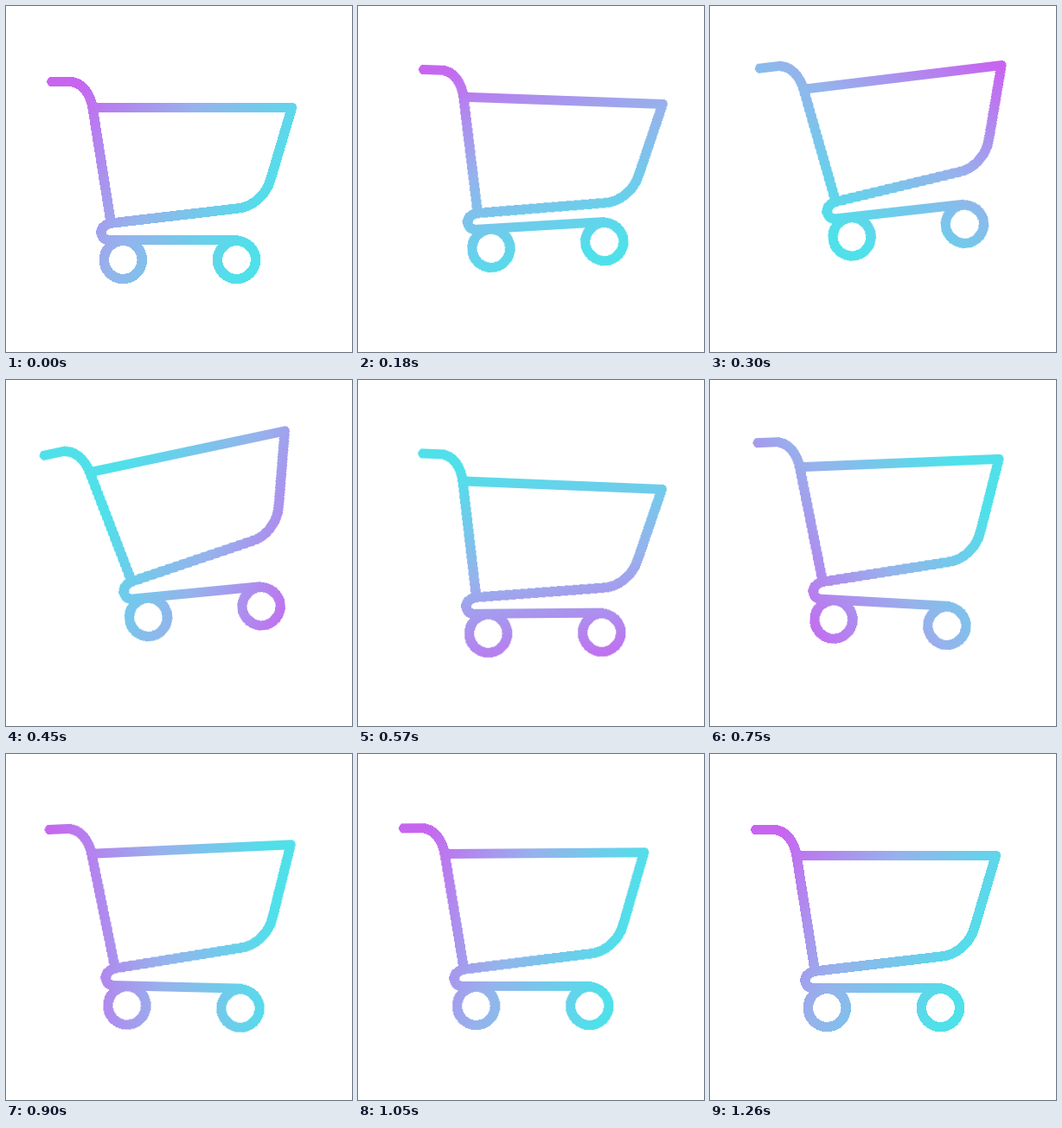
Animation, 400 px wide and 400 px high, one loop 3.29 s. Source, as an HTML page without scripts:

```html
<!DOCTYPE html>
<html lang="en">
<head>
<meta charset="utf-8">
<title>Hopping cart</title>
<style>
  html, body { margin: 0; width: 100%; height: 100%; overflow: hidden; background: #fff; }
  svg { display: block; width: 100vw; height: 100vh; }

  .drift, .hop, .basket, .base, .tint { animation: 3.29s ease-in-out infinite; }
  .drift  { animation-name: drift; }
  .hop    { animation-name: hop; }
  .basket { animation-name: basket; }
  .base   { animation-name: base; }
  .tint   { animation-name: tint; animation-timing-function: cubic-bezier(.3, .1, .4, 1); }

  .basket, .base {
    transform-origin: 115px 261px; /* hinge */
    fill: none; stroke: #000; stroke-width: 11.4;
    stroke-linecap: round; stroke-linejoin: round;
    shape-rendering: crispEdges;
  }
  /* black lines take the colour, white stays white */
  .tint { transform-origin: 195px 200px; mix-blend-mode: screen; }

  @keyframes drift {
    0%       { transform: none; animation-timing-function: cubic-bezier(.3, .3, .6, 1); }
    12%      { transform: translateX(27.5px); animation-timing-function: cubic-bezier(.5, 0, .8, .8); }
    18%      { transform: translateX(13px); animation-timing-function: ease-out; animation-timing-function: cubic-bezier(.4, .3, .8, .9); }
    34%, to  { transform: none; }
  }
  /* three shrinking parabolas */
  @keyframes hop {
    0%, 3.5%, 17.7%, 29%, 33.5%, to { transform: translateY(0); animation-timing-function: cubic-bezier(.333, .667, .667, 1); }
    11%, 23.4%, 31.2% { animation-timing-function: cubic-bezier(.333, 0, .667, .333); }
    11%   { transform: translateY(-25.7px); }
    23.4% { transform: translateY(-17.7px); }
    31.2% { transform: translateY(-2.7px); }
  }
  @keyframes basket {
    0%, 34.6%, to { transform: rotate(0deg); }
    5%    { transform: rotate(2.2deg); }
    12.5% { transform: rotate(-13.2deg); }
    19.1% { transform: rotate(5deg); }
    24%   { transform: rotate(-3.3deg); }
  }
  @keyframes base {
    0%, 32%, to { transform: rotate(0deg); }
    11% { transform: rotate(-6.8deg); }
    22% { transform: rotate(3.2deg); }
  }
  @keyframes tint {
    0%        { transform: rotate(28deg); }
    38.3%, to { transform: rotate(388deg); }
  }
</style>
</head>
<body>
<svg viewBox="0 0 400 400">
  <linearGradient id="fade" gradientUnits="userSpaceOnUse" x1="45" y1="0" x2="305" y2="0">
    <stop offset="0" stop-color="#c765f0"/>
    <stop offset=".5" stop-color="#96b2ec"/>
    <stop offset="1" stop-color="#50e0ea"/>
  </linearGradient>

  <g class="drift">
    <g class="hop">
      <rect x="-200" y="-200" width="800" height="800" fill="#fff"/>
      <g class="basket">
        <path d="M53 87.5H73C88 87.5 97.5 102 100 117L121 249"/>
        <path d="M101 117.3H330.5L306 200C301 218 286 232 268 234L124 250.8C115 252 110 256 110 261"/>
      </g>
      <g class="base">
        <path d="M110 261C110 267 114 270.7 120 270.7H266.5"/>
        <circle cx="135.3" cy="293.5" r="22"/>
        <circle cx="266.5" cy="293.5" r="22"/>
      </g>
      <rect class="tint" x="-155" y="-150" width="700" height="700" fill="url(#fade)"/>
    </g>
  </g>
</svg>
</body>
</html>
```
